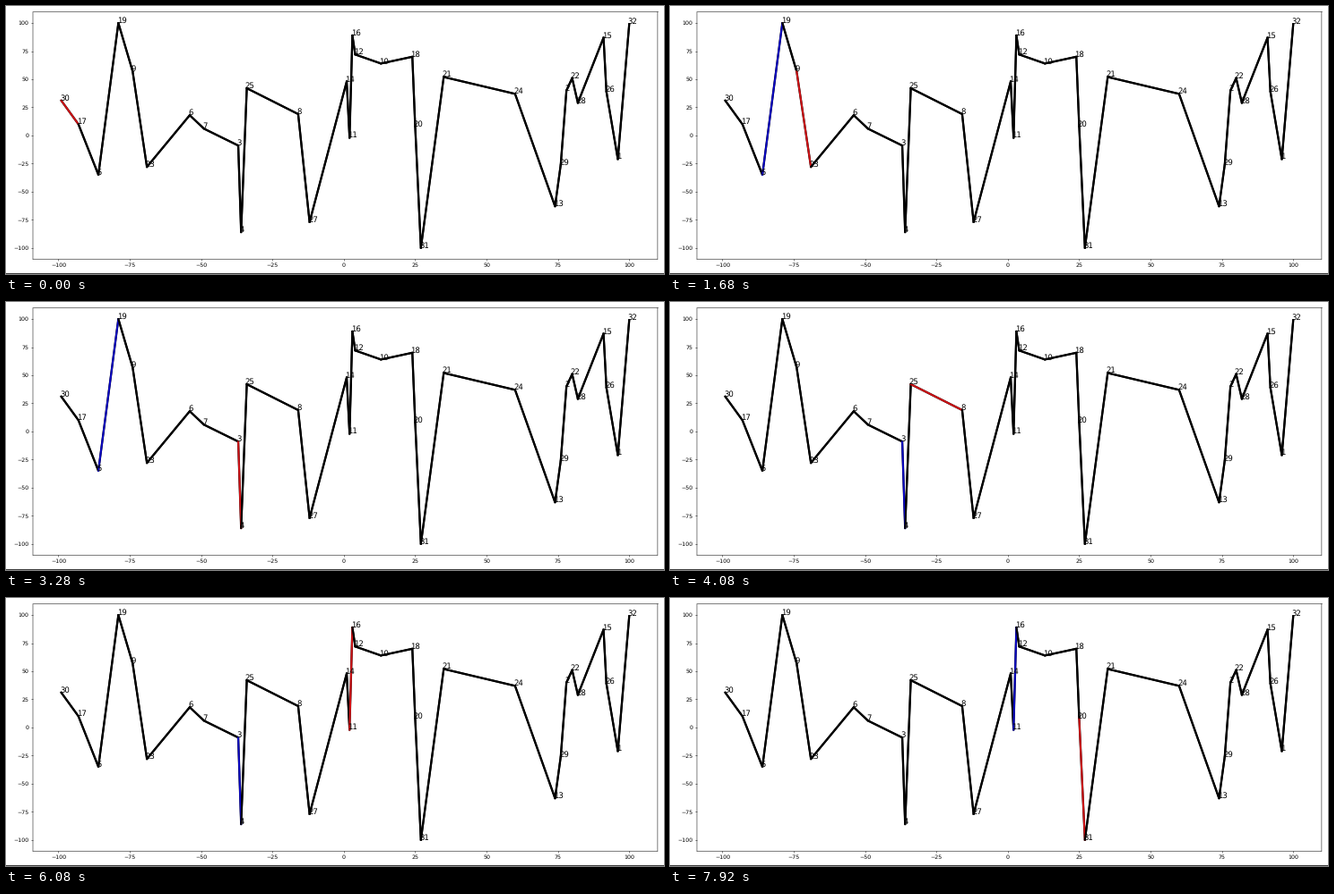
Recreate the animation shown at these times as a matplotlib script. Size 734 by 300 pixels, loop 8000 ms.

```python
import math

import matplotlib.pyplot as plt
from matplotlib.animation import FuncAnimation
from matplotlib.patches import Rectangle

W, H, DPI = 734, 300, 45
FRAMES, INTERVAL = 100, 80
FIRST_STEP, STEP = 4.25, 5.155  # scan pace, in frames
RED, BLUE = "#d11216", "#0a05c4"
LABEL_SHIFT = -0.55

plt.rcParams["font.family"] = "DejaVu Sans"
plt.rcParams["text.hinting"] = "no_hinting"

# vertices of the path; each one's label is its place in this list
VERTICES = [
    (96, -21), (78, 40), (-37, -9), (-36, -86), (-86, -35), (-54, 18),
    (-49, 6), (-16, 19), (-74, 57), (13, 64), (2, -2), (4, 72),
    (74, -63), (1, 48), (91, 87), (3, 89), (-93, 10), (24, 70),
    (-79, 100), (25, 8), (35, 52), (80, 51), (-69, -28), (60, 37),
    (-34, 42), (92, 39), (-12, -77), (82, 29), (76, -26), (-99, 31),
    (27, -100), (100, 99),
]
path = sorted(VERTICES)
xs, ys = zip(*path)


def steepness(i):
    return abs((ys[i + 1] - ys[i]) / (xs[i + 1] - xs[i]))


def add_axes(fig, left, right, top, bottom):
    """Axes whose edges are given in pixels from the top left."""
    ax = fig.add_axes([left / W, 1 - bottom / H,
                       (right - left) / W, (bottom - top) / H])
    ax.set_xlim(-108.95, 109.95)
    ax.set_ylim(-110, 110)
    ax.set_xticks(range(-100, 101, 25))
    ax.set_yticks(range(-100, 101, 25))
    for side in ("left", "right", "bottom"):
        ax.spines[side].set_snap(False)
    return ax


fig = plt.figure(figsize=((W + 1e-6) / DPI, (H + 1e-6) / DPI), dpi=DPI,
                 facecolor="white")
ax = add_axes(fig, 30, 726.9, 6.5, 283.3)
fig.add_artist(Rectangle((0, 0), W, 1, color="0.25", lw=0, transform=None))

ax.plot(xs, ys, color="black", lw=3.7)
edges = [ax.plot(xs[i:i + 2], ys[i:i + 2], lw=3.2)[0]
         for i in range(len(path) - 1)]
for label, (x, y) in enumerate(VERTICES, start=1):
    ax.text(x + LABEL_SHIFT, y, str(label), fontsize=13.7)


def update(frame):
    current = max(0, math.floor((frame - FIRST_STEP) / STEP) + 1)
    for edge in edges:
        edge.set_color("black")
    if current > 0:
        edges[max(range(current), key=steepness)].set_color(BLUE)
    edges[current].set_color(RED)
    return edges


anim = FuncAnimation(fig, update, frames=FRAMES, interval=INTERVAL,
                     repeat=True, repeat_delay=0, blit=False)
plt.show()
```
